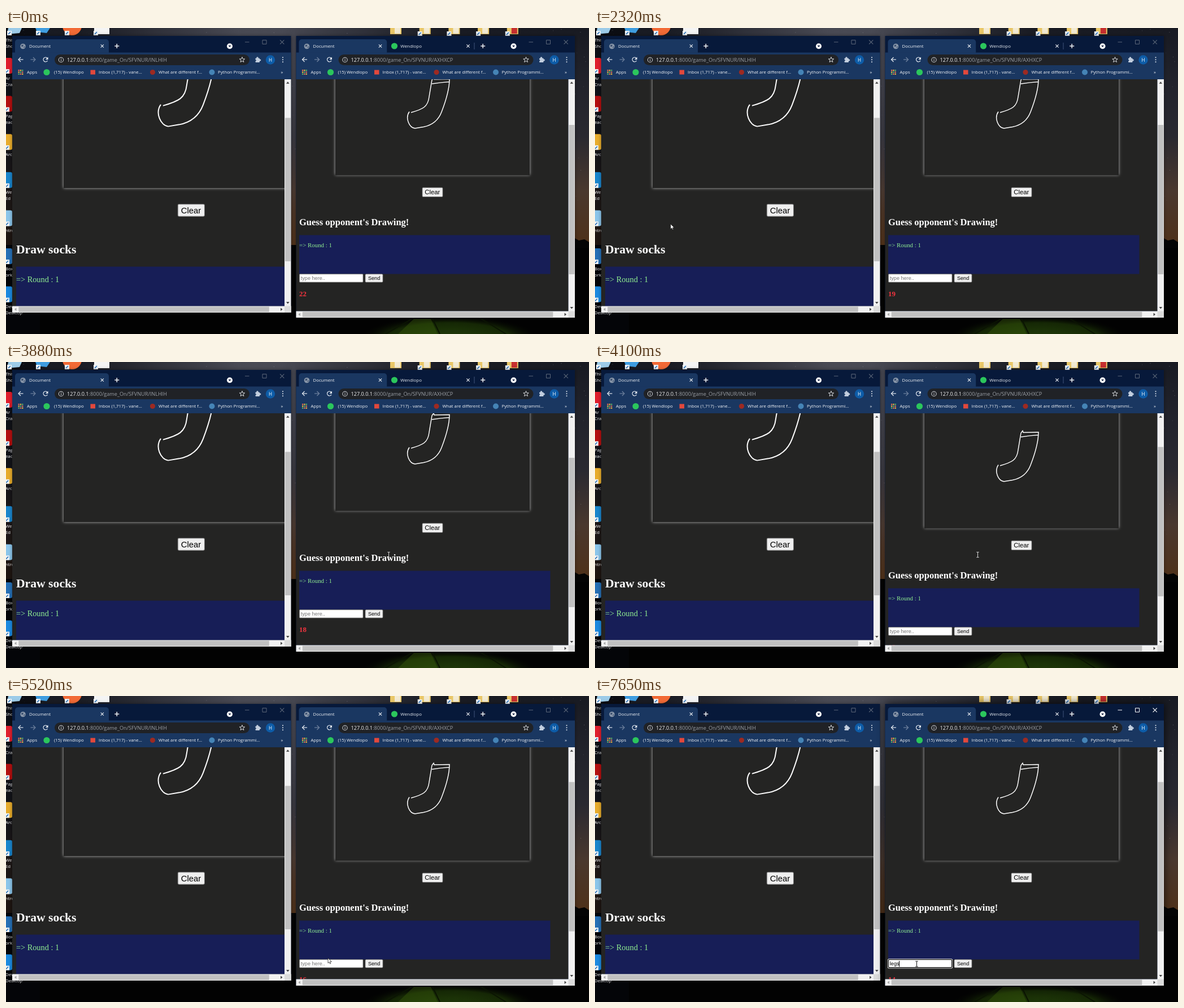
An HTML page with a canvas that plays this animation: 1032 px wide and 543 px high, repeating every 8000 ms.

```html
<!DOCTYPE html>
<html lang="en">
<head>
<meta charset="utf-8">
<title>Drawing game</title>
<style>
html, body { margin: 0; width: 100%; height: 100%; overflow: hidden; background: #000; }
canvas { display: block; width: 1032px; height: 543px; }
</style>
</head>
<body>
<canvas id="stage" width="1032" height="543"></canvas>
<script>
const ctx = document.getElementById('stage').getContext('2d');
const LOOP = 8000;
const UI = '"Open Sans", "Noto Sans", sans-serif';
const SANS = '"Liberation Sans", Arial, sans-serif';
const SERIF = '"Liberation Serif", "Times New Roman", serif';
const PAGE = '#242423', BAR = '#1a3761', NAVY = '#07193a';

const sock = new Path2D(
  'M754 92 L757 88 L758 91 L785 90.5 C785 112 776 136 771 149 S757 172 739 175.5 ' +
  'L724 178 C714 177 706 160 714 148.5 ' +
  'M754 92 L749 122 C747 140 738 144 717 150 M754 99 Q770 96.5 785 95.5');

function rect(x, y, w, h, fill) {
  ctx.fillStyle = fill;
  ctx.fillRect(x, y, w, h);
}
function round(x, y, w, h, r, fill, stroke, lw = 1) {
  ctx.beginPath();
  ctx.roundRect(x, y, w, h, r);
  if (fill) { ctx.fillStyle = fill; ctx.fill(); }
  if (stroke) { ctx.strokeStyle = stroke; ctx.lineWidth = lw; ctx.stroke(); }
}
function disc(x, y, r, fill) {
  ctx.beginPath();
  ctx.arc(x, y, r, 0, 7);
  ctx.fillStyle = fill;
  ctx.fill();
}
function ring(x, y, r, stroke, from = 0, to = 7, lw = 1.1) {
  ctx.beginPath();
  ctx.arc(x, y, r, from, to);
  ctx.strokeStyle = stroke;
  ctx.lineWidth = lw;
  ctx.stroke();
}
function trace(pts) {
  ctx.beginPath();
  pts.forEach(([x, y], i) => i ? ctx.lineTo(x, y) : ctx.moveTo(x, y));
}
function line(pts, stroke, lw = 1.1) {
  trace(pts);
  ctx.strokeStyle = stroke;
  ctx.lineWidth = lw;
  ctx.stroke();
}
function poly(pts, fill) {
  trace(pts);
  ctx.fillStyle = fill;
  ctx.fill();
}
function text(s, x, y, size, family, fill, weight = 'normal') {
  ctx.font = `${weight} ${size}px ${family}`;
  ctx.fillStyle = fill;
  ctx.fillText(s, x, y);
  return x + ctx.measureText(s).width;
}
function cross(x, y, r, color) {
  line([[x - r, y - r], [x + r, y + r]], color);
  line([[x - r, y + r], [x + r, y - r]], color);
}
function plus(x, y) {
  line([[x - 4, y], [x + 4, y]], '#fff', 1.4);
  line([[x, y - 4], [x, y + 4]], '#fff', 1.4);
}
function gradient(g, ...colors) {
  colors.forEach((c, i) => g.addColorStop(i / (colors.length - 1), c));
  return g;
}
function seeded(seed) {
  return () => (seed = (seed * 16807) % 2147483647) / 2147483647;
}
const progress = (t, from, to) => Math.min(1, Math.max(0, (t - from) / (to - from)));
const easeOut = p => 1 - (1 - p) ** 2;
const mix = (a, b, p) => a + (b - a) * p;

function shortcut(x, y) {
  rect(x, y, 8, 8, '#eef2f6');
  line([[x + 2, y + 6], [x + 6, y + 2]], '#1767b5', 1.4);
}

function sky() {
  rect(0, 0, 1032, 543, '#020202');
  rect(0, 0, 1032, 385, gradient(ctx.createLinearGradient(0, 0, 0, 385),
    '#181a22', '#22232b', '#2a2930', '#4a382e', '#4f3119'));
  rect(0, 0, 1032, 385, gradient(ctx.createRadialGradient(450, 0, 40, 450, 0, 330),
    'rgba(120,120,132,.5)', 'rgba(100,100,112,.3)', 'rgba(80,80,90,0)'));
  rect(0, 0, 60, 543, 'rgba(5,7,11,.65)');
  const rnd = seeded(41);
  for (let i = 0; i < 400; i++) {
    rect(rnd() * 1032, rnd() * 340, 1, 1, `rgba(205,205,215,${rnd() * .4})`);
  }
  poly([[1005, 372], [1014, 377], [1024, 375], [1032, 380], [1032, 390], [1005, 390]], '#040404');
}

function tent() {
  ctx.save();
  ctx.translate(785, 550);
  ctx.scale(1, .25);
  rect(-170, -150, 340, 160, gradient(ctx.createRadialGradient(0, 0, 5, 0, 0, 160),
    '#1f3808', '#1b3207', '#152705', 'rgba(2,2,2,0)'));
  ctx.restore();
  poly([[694, 543], [722, 516], [752, 516], [764, 543]], 'rgba(64,100,14,.35)');
  [[672, 722], [768, 754], [885, 838]].forEach(([a, b]) => line([[a, 543], [b, 514]], '#0b1403', 2));
}

function desktop() {
  sky();
  tent();
  poly([[4, 0], [28, 0], [24, 9], [2, 11]], '#9ccbe8');
  poly([[52, 0], [78, 0], [72, 9], [55, 7]], '#3f9de0');
  disc(117, -4, 17, '#f26a35');
  rect(156, 0, 27, 11, '#f4f4f4');
  for (let i = 0; i < 4; i++) shortcut(2 + i * 51, 5);
  for (let i = 0; i < 5; i++) {
    const x = 680 + i * 51.7;
    rect(x, 0, 20, 11, '#e9c768');
    rect(x + 8, 0, 10, 10, i === 4 ? '#c62f2f' : '#f2ead2');
    if (i) shortcut(x - 3, 6);
  }

  const pitch = 67.6;
  ['#e01f2d', '#b40f0f', '#e8ac2c', '#1a86cc', '#8cc6ea', '#2670b5', '#1c8ae0'].forEach((c, i) => {
    round(-20, 53 + i * pitch, 31, 28, 3, c);
    shortcut(-2, 73 + i * pitch);
  });
  ['This|Sho', 'Ar|Cra', 'Page|ead', 'Arc', 'Web|Ed', 'ntro', 'Box|ork', 'Dev|Desktop'].forEach((s, i) =>
    s.split('|').forEach((row, j) => text(row, -1, 24 + i * pitch + j * 11, 7.8, UI, '#f4f4f4')));
}

function button(label, x, y, w, h, size, tx, base) {
  round(x, y, w, h, 1.5, '#efefef', '#767676', .8);
  text(label, tx, base, size, SANS, '#000');
}

function page(heading) {
  ctx.save();
  ctx.shadowColor = '#c0c0c0';
  ctx.shadowBlur = 5;
  rect(583, 20, 344, 241.3, PAGE);
  ctx.restore();
  ctx.strokeStyle = '#fff';
  ctx.lineWidth = 1.5;
  ctx.stroke(sock);
  button('Clear', 737, 283.2, 36, 16.4, 11.3, 741.3, 295.2);
  text(heading, 519, 350, 16.5, SERIF, '#fff', 'bold');
  rect(519, 367.5, 444.5, 69, '#171e57');
  text('=> Round : 1', 519, 388.6, 10.9, SERIF, '#90ee90');
}

function typedAt(t) {
  return t < 6930 ? '' : 'legs'.slice(0, 1 + Math.floor((t - 6930) / 240));
}

function secondsLeft(t) {
  return t < 330 ? 22 : 21 - Math.max(0, Math.floor((t - 210) / 1000));
}

function guessForm(t) {
  const focus = t >= 6030;
  const typed = typedAt(t);
  if (focus) {
    round(518, 435.2, 115, 17.2, 2.5, '#fff');
    round(519.4, 436.6, 112.2, 14.4, 1.5, '#fff', '#101010', 1.4);
  } else {
    round(519.5, 436.7, 112.5, 14.4, 1, '#fff', '#767676', .9);
  }
  const end = text(typed, 521.8, 446.8, 9.1, SANS, '#000');
  if (!typed) text('type here..', 521.8, 446.8, 9.1, SANS, '#757575');
  if (focus && (t < 6570 || typed)) rect(Math.round(end), 439, 1, 10.5, '#000');
  button('Send', 636, 436.7, 31, 14.4, 9.1, 641, 446.8);
  text(String(secondsLeft(t)), 519, 476, 12.9, SERIF, '#f5343f', 'bold');
}

function globe(x, y) {
  disc(x, y, 4.8, '#8795a8');
  poly([[x - 3, y - 2], [x + 1, y - 3], [x, y], [x - 2, y + 1]], '#34496a');
  poly([[x + 1, y + 1], [x + 4, y], [x + 2, y + 3]], '#34496a');
}

function navArrow(x, dir, color) {
  const tip = x + 4 * dir;
  line([[x - 4.5 * dir, 56], [tip, 56]], color, 1.2);
  line([[x, 52], [tip, 56], [x, 60]], color, 1.2);
}

function toolbar(path) {
  navArrow(26, -1, '#e6ebf2');
  navArrow(48, 1, '#71839f');
  ring(70, 56, 3.9, '#e6ebf2', .5, 5.5, 1.3);
  poly([[74.5, 51.5], [74.5, 56], [70, 56]], '#e6ebf2');

  round(86, 47, 345, 19, 9.5, '#202226');
  ring(97.5, 56.5, 4.2, '#c8ccd2');
  rect(97, 55.8, 1.1, 3, '#c8ccd2');
  rect(97, 53.9, 1.1, 1.1, '#c8ccd2');
  const x = text('127.0.0.1', 108, 59.6, 9.15, UI, '#f0f1f3');
  text(':8000/game_On/SFVNUR/' + path, x, 59.6, 9.15, UI, '#9a9fa6');

  const star = [];
  for (let i = 0; i <= 10; i++) {
    const r = i % 2 ? 2.1 : 5, a = i * Math.PI / 5;
    star.push([418 + r * Math.sin(a), 56.5 - r * Math.cos(a)]);
  }
  line(star, '#d9dce0', 1);
  round(441.5, 53.5, 7.5, 7.5, 1, '#c3cfdf');
  disc(445, 53, 1.7, '#c3cfdf');
  disc(449.6, 57, 1.7, '#c3cfdf');
  disc(441.6, 57.5, 1.2, BAR);
  disc(468, 56.5, 8.2, '#0d5ca8');
  text('H', 465.1, 59.6, 8.2, UI, '#fff');
  for (let i = -1; i < 2; i++) disc(490, 56.2 + 4 * i, 1, '#e6ebf2');
}

function bookmarks() {
  const dots = ['#ea6a5a', '#f0b93a', '#58b368'];
  for (let i = 0; i < 9; i++) {
    const row = Math.floor(i / 3);
    rect(21.5 + i % 3 * 3.3, 74 + row * 3.3, 2.3, 2.3, dots[(i + row) % 3]);
  }
  disc(72, 78.5, 5.6, '#2bc65c');
  rect(149.5, 74.5, 8.5, 8, '#e2483c');
  disc(259.5, 78.5, 4.6, '#9c2a22');
  disc(364.5, 78.5, 5, '#4584b6');
  [['Apps', 37], ['(15) Wendlopo', 85], ['Inbox (1,717) - vane...', 164], ['What are different f...', 270],
   ['Python Programmi...', 375], ['»', 486.5]].forEach(([s, x]) => text(s, x, 81.3, 7.8, UI, '#f3f5f8'));
}

function arrow(x, y, dx, dy, color = '#404040') {
  poly([[x + dx * 2, y + dy * 2], [x - dx * 1.4 + dy * 2.8, y - dy * 1.4 + dx * 2.8],
        [x - dx * 1.4 - dy * 2.8, y - dy * 1.4 - dx * 2.8]], color);
}

function scrollbars(bottom, top, height) {
  const y = bottom - 11.5;
  rect(493, 91, 11.5, bottom - 91, '#f1f1f1');
  rect(11, y, 493.5, 11.5, '#f1f1f1');
  rect(493, y, 11.5, 11.5, '#dcdcdc');
  rect(494, top, 9.8, height, '#c1c1c1');
  rect(22.3, y + 1, 443.5, 9.5, '#c1c1c1');
  arrow(498.8, 97.3, 0, -1);
  arrow(498.8, y - 6, 0, 1);
  arrow(17, y + 5.8, -1, 0, '#a3a3a3');
  arrow(487.5, y + 5.8, 1, 0);
}

function tabs(tabEnd, second, focus) {
  round(16, 20, tabEnd - 16, 26, [5, 5, 0, 0], BAR);
  rect(11, 43.5, 493.5, 47.5, BAR);
  globe(30, 32.5);
  text('Document', 41, 35.2, 7.8, UI, '#f3f5f8');
  cross(tabEnd - 11.7, 32, 2.6, '#eef1f5');
  if (second) {
    disc(185, 32, 5.6, '#2bc65c');
    text('Wendlopo', 195.8, 35.2, 7.9, UI, '#e6eaf0');
    cross(315.5, 32, 2.6, '#eef1f5');
    rect(326, 26, 1, 12, '#41557a');
  }
  plus(second ? 341.7 : 196.3, 32);
  disc(396, 32.3, 5, '#fff');
  poly([[393.6, 31], [398.4, 31], [396, 34]], NAVY);
  const color = focus ? '#fff' : '#5c6678';
  rect(423, 24.5, 7.5, 1, color);
  round(454, 21.5, 7, 7, 0, null, color);
  cross(488.7, 25, 3.6, color);
}

function browser({ dx, bottom, path, tabEnd, second, focus, thumb, content }) {
  ctx.save();
  ctx.translate(dx, 0);
  ctx.save();
  ctx.shadowColor = focus ? 'rgba(0,0,0,.75)' : 'rgba(0,0,0,.4)';
  ctx.shadowBlur = focus ? 14 : 6;
  rect(11, 14, 493.5, bottom - 14, NAVY);
  ctx.restore();

  tabs(tabEnd, second, focus);
  toolbar(path);
  bookmarks();
  ctx.save();
  ctx.beginPath();
  ctx.rect(11, 91, 482, bottom - 102.5);
  ctx.clip();
  rect(11, 91, 482, bottom - 102.5, PAGE);
  ctx.translate(-dx, 0);
  content();
  ctx.restore();
  scrollbars(bottom, ...thumb);
  ctx.restore();
}

// The pointer rests between moves: start, end, x, y
const moves = [
  [330, 690, 154, 384], [2600, 2740, 58, 400], [2740, 3010, 456, 356],
  [3300, 3450, 677, 342], [4990, 5520, 570, 465]
];

// Loose loops around the left heading
function roam(t) {
  const s = Math.min(t, 2570) - 940;
  return [115 + 90 * Math.sin(.445 + s * .00438), 362 + 22 * Math.cos(s * .0029)];
}

function pointerAt(t) {
  let pos = [958, 519];
  for (const [from, to, x, y] of moves) {
    if (t < from) break;
    const p = progress(t, from, to);
    pos = [mix(pos[0], x, p), mix(pos[1], y, p)];
    if (from === 330 && t > 940) pos = roam(t);
  }
  return pos;
}

function beam(x, y, color) {
  line([[x, y - 4], [x, y + 4]], color, 1);
  [-4.6, 4.6].forEach(d => line([[x - 2.2, y + d], [x + 2.2, y + d]], color, 1));
}

function pointer(t) {
  if (t < 330) return;
  if (t >= 6210) return beam(569.5, 475.5, '#111');
  if (t >= 3450 && t < 4990) return beam(677.5, 342, '#d6d6d6');
  const [x, y] = pointerAt(t);
  const shape = [[0, 0], [0, 9], [2.1, 7.2], [3.5, 10.2], [4.9, 9.6], [3.6, 6.7], [6.3, 6.5], [0, 0]]
    .map(([a, b]) => [x + a, y + b]);
  poly(shape, '#fff');
  line(shape, '#111', .7);
}

function draw(t) {
  const scroll = 40 * easeOut(progress(t, 3865, 4250)) - 9 * easeOut(progress(t, 4490, 4660));
  desktop();
  browser({
    dx: 0, bottom: 505, path: 'INLHIH', tabEnd: 182, thumb: [159.5, 254.5],
    content() {
      const zoom = 1.313;
      ctx.translate(102, 284);
      ctx.scale(zoom, zoom);
      ctx.translate(-583, -261.3);
      page('Draw socks');
    }
  });
  browser({
    dx: 502.5, bottom: 514, path: 'AXHXCP', tabEnd: 171.7, second: true,
    focus: t >= 6000, thumb: [172 - scroll * .625, 265],
    content() {
      ctx.translate(0, Math.round(scroll));
      page("Guess opponent's Drawing!");
      guessForm(t);
    }
  });
  pointer(t);
}

const start = performance.now();
function tick() {
  draw((performance.now() - start) % LOOP);
  requestAnimationFrame(tick);
}
tick();
</script>
</body>
</html>
```
